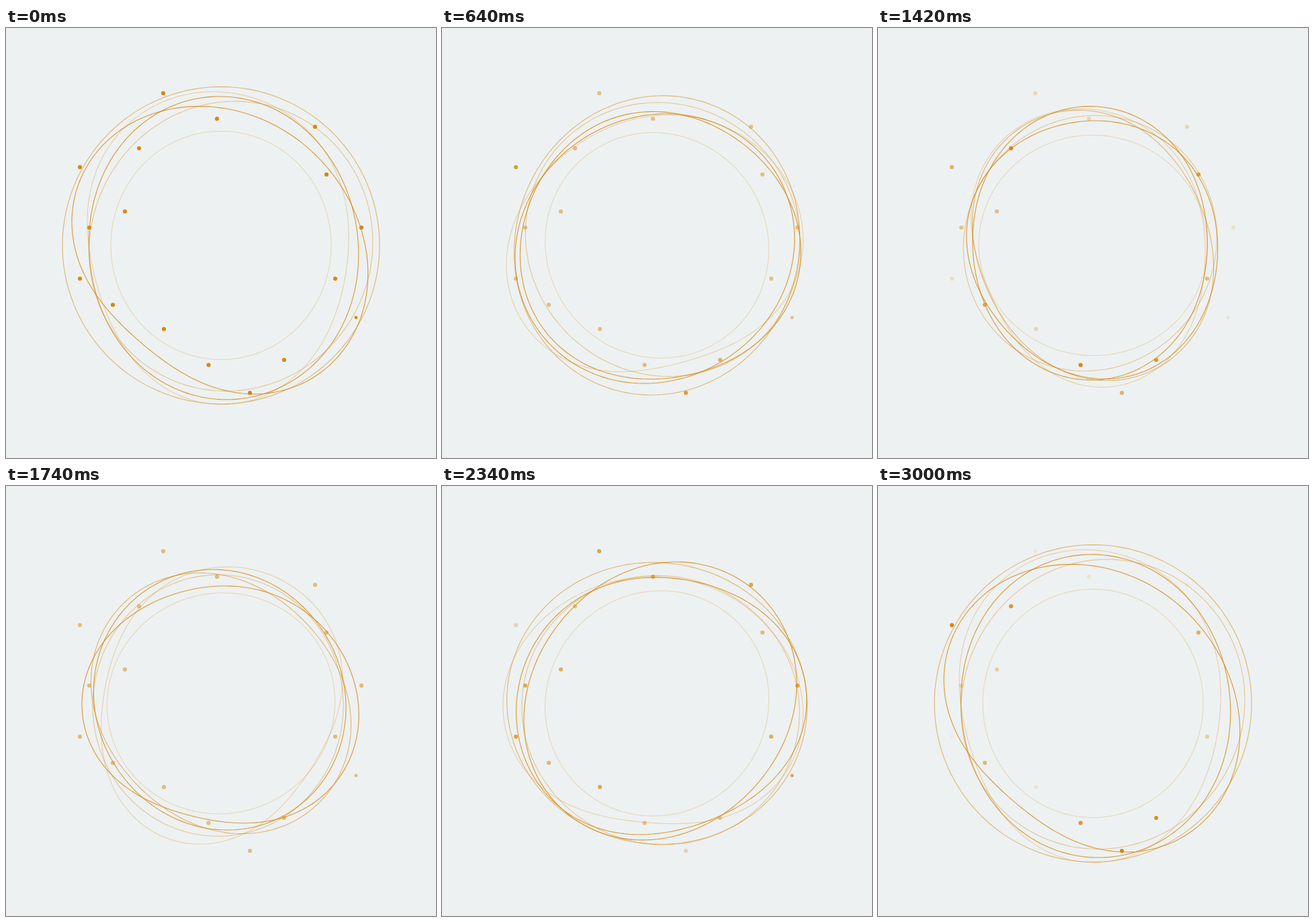
Write an HTML page with a canvas that moves like this. It is 640 by 640 pixels and loops after 3020 ms.

```html
<!DOCTYPE html>
<html lang="en">
<head>
<meta charset="utf-8">
<title>Drifting rings</title>
<style>
  html, body { margin: 0; width: 100%; height: 100%; overflow: hidden; background: #edf1f2; }
  canvas { display: block; width: 640px; height: 640px; }
</style>
</head>
<body>
<canvas id="stage" width="640" height="640"></canvas>
<script>
const ctx = document.getElementById('stage').getContext('2d');
const LOOP = 3020, CYCLE = 3000, TAU = 2 * Math.PI, RAD = Math.PI / 180;
const GOLD = '#d68910';

// Each ring breathes around a mean radius and carries a few travelling waves.
// wave: [lobes, turns per cycle, height, starting angle in degrees]
const rings = [
  { alpha: .26, mean: 167, breath: 0, waves: [[2, -1, 3, 180]] },
  { alpha: .32, mean: 201, breath: 12, waves: [[2, 2, 20, 168], [3, 2, 5, -85], [1, 0, 4, 190]] },
  { alpha: .42, mean: 201, breath: 12, waves: [[1, -1, 10, 10], [1, 0, 5, 0], [2, -2, 4, 240]] },
  { alpha: .58, mean: 212, breath: 24, waves: [[2, -1, 9, 300], [2, 0, 4.5, 120], [2, -2, 4.5, 120]] },
  { alpha: .85, mean: 201, breath: 12,
    waves: [[2, -2, 10, 107], [2, 1, 8, 84], [2, 0, 7, 38], [3, -2, 4.5, 202], [1, 0, 4, 55]] },
  { alpha: .85, mean: 201, breath: 12, waves: [[2, -2, 10, 133], [2, 0, 7, 216], [1, 1, 5.5, 45]] }
];

// Three twinkle rhythms; every dot blends two neighbouring ones.
const BEATS = [0, 380, 920, 1420, 2080, 2580, CYCLE];
const RHYTHMS = [
  [1, 0, 1, .15, .95, .6, 0],
  [1, 1, 0, 1, 0, .9, .85],
  [1, 1, .6, .6, .4, .2, 1]
];

// [x, y, rhythm, radius]
const dots = [
  [234, 97, .13], [314, 135, .15], [460, 147, .12], [198, 179, 1], [110, 207, 2],
  [477, 218, .75], [177, 273, .4], [124, 297, .35], [529, 297, 0], [110, 373, .05],
  [490, 373, .4], [159, 412, .65], [521, 431, 0, 2.4], [235, 448, .15],
  [301.5, 501.5, 1], [414, 494, 1.4], [363, 543, 1.95]
];

// Linear value at fractional index p of a list.
function lerpAt(list, p) {
  const i = Math.min(Math.floor(p), list.length - 2);
  return list[i] + (list[i + 1] - list[i]) * (p - i);
}

function drawRing({ alpha, mean, breath, waves }, phase) {
  const size = mean + breath * Math.cos(phase);
  ctx.globalAlpha = alpha;
  ctx.beginPath();
  for (let deg = 0; deg < 360; deg += 2) {
    const a = deg * RAD;
    const r = waves.reduce((sum, [lobes, turns, height, from]) =>
      sum + height * Math.cos(lobes * a - turns * phase - from * RAD), size);
    ctx.lineTo(320 + r * Math.cos(a), 323.5 + r * Math.sin(a));
  }
  ctx.closePath();
  ctx.stroke();
}

function drawDot([x, y, rhythm, radius = 3.1], levels) {
  ctx.globalAlpha = lerpAt(levels, rhythm);
  ctx.beginPath();
  ctx.arc(x, y, radius, 0, TAU);
  ctx.fill();
}

const start = performance.now();

function draw() {
  const t = Math.min((performance.now() - start) % LOOP, CYCLE);
  const next = Math.max(1, BEATS.findIndex(b => b >= t));
  const beat = next - (BEATS[next] - t) / (BEATS[next] - BEATS[next - 1]);
  const levels = RHYTHMS.map(list => lerpAt(list, beat));

  ctx.clearRect(0, 0, 640, 640);
  ctx.strokeStyle = ctx.fillStyle = GOLD;
  ctx.lineWidth = 1.1;
  rings.forEach(ring => drawRing(ring, t / CYCLE * TAU));
  dots.forEach(dot => drawDot(dot, levels));
  requestAnimationFrame(draw);
}
draw();
</script>
</body>
</html>
```
